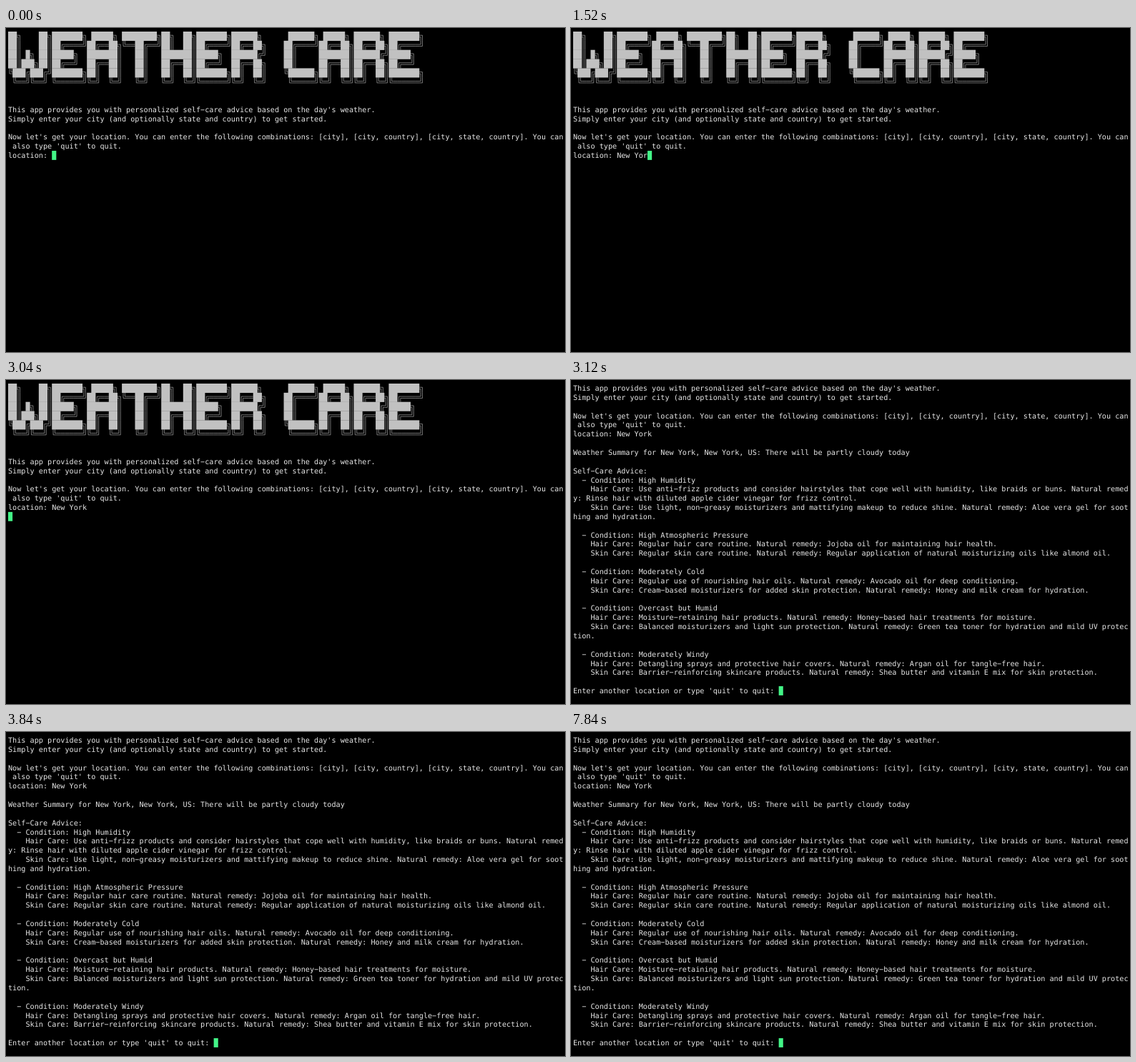
Recreate the animation shown at these times as an HTML page with a canvas. Size 782 by 454 pixels, loop 8.16 s.

```html
<!DOCTYPE html>
<html lang="en">
<head>
<meta charset="utf-8">
<title>Weather Care</title>
<style>
  html, body { margin: 0; width: 100%; height: 100%; overflow: hidden; background: #000; }
  canvas { display: block; }
</style>
</head>
<body>
<canvas id="screen" width="782" height="454"></canvas>
<script>
const LOOP = 8160;
const COLS = 127, ROWS = 34;
const CELL_W = 6.12, CELL_H = 12.85, LEFT = 3, TOP = 5;
const FONT_SIZE = CELL_W / 0.602;
const COLORS = { back: '#000', block: '#c1c1c1', text: '#e6e6e6', cursor: '#43f587' };

const BANNER = `
██╗    ██╗███████╗ █████╗ ████████╗██╗  ██╗███████╗██████╗      ██████╗ █████╗ ██████╗ ███████╗
██║    ██║██╔════╝██╔══██╗╚══██╔══╝██║  ██║██╔════╝██╔══██╗    ██╔════╝██╔══██╗██╔══██╗██╔════╝
██║ █╗ ██║█████╗  ███████║   ██║   ███████║█████╗  ██████╔╝    ██║     ███████║██████╔╝█████╗
██║███╗██║██╔══╝  ██╔══██║   ██║   ██╔══██║██╔══╝  ██╔══██╗    ██║     ██╔══██║██╔══██╗██╔══╝
╚███╔███╔╝███████╗██║  ██║   ██║   ██║  ██║███████╗██║  ██║    ╚██████╗██║  ██║██║  ██║███████╗
 ╚══╝╚══╝ ╚══════╝╚═╝  ╚═╝   ╚═╝   ╚═╝  ╚═╝╚══════╝╚═╝  ╚═╝     ╚═════╝╚═╝  ╚═╝╚═╝  ╚═╝╚══════╝
`.slice(1);

const INTRO = `${BANNER}

This app provides you with personalized self-care advice based on the day's weather.
Simply enter your city (and optionally state and country) to get started.

Now let's get your location. You can enter the following combinations: [city], [city, country], [city, state, country]. You can also type 'quit' to quit.
location: `;

const ANSWER = 'New York';
const KEY_TIMES = [320, 560, 720, 960, 1120, 1280, 1520, 1680];
const ENTER_TIME = 2400, REPORT_TIME = 3120;

const REPORT = `
Weather Summary for New York, New York, US: There will be partly cloudy today

Self-Care Advice:
  - Condition: High Humidity
    Hair Care: Use anti-frizz products and consider hairstyles that cope well with humidity, like braids or buns. Natural remedy: Rinse hair with diluted apple cider vinegar for frizz control.
    Skin Care: Use light, non-greasy moisturizers and mattifying makeup to reduce shine. Natural remedy: Aloe vera gel for soothing and hydration.

  - Condition: High Atmospheric Pressure
    Hair Care: Regular hair care routine. Natural remedy: Jojoba oil for maintaining hair health.
    Skin Care: Regular skin care routine. Natural remedy: Regular application of natural moisturizing oils like almond oil.

  - Condition: Moderately Cold
    Hair Care: Regular use of nourishing hair oils. Natural remedy: Avocado oil for deep conditioning.
    Skin Care: Cream-based moisturizers for added skin protection. Natural remedy: Honey and milk cream for hydration.

  - Condition: Overcast but Humid
    Hair Care: Moisture-retaining hair products. Natural remedy: Honey-based hair treatments for moisture.
    Skin Care: Balanced moisturizers and light sun protection. Natural remedy: Green tea toner for hydration and mild UV protection.

  - Condition: Moderately Windy
    Hair Care: Detangling sprays and protective hair covers. Natural remedy: Argan oil for tangle-free hair.
    Skin Care: Barrier-reinforcing skincare products. Natural remedy: Shea butter and vitamin E mix for skin protection.

Enter another location or type 'quit' to quit: `;

const ctx = document.getElementById('screen').getContext('2d');

// Directions in which the arms of each corner point.
const CORNERS = { '╔': [1, 1], '╗': [-1, 1], '╚': [1, -1], '╝': [-1, -1] };

function drawDoubleLine(char, x, y) {
  const halfW = CELL_W / 2, halfH = CELL_H / 2;
  const cx = x + halfW, cy = y + halfH;
  ctx.beginPath();
  for (const s of [-1.2, 1.2]) {
    if (char === '═') {
      ctx.moveTo(x, cy + s);
      ctx.lineTo(x + CELL_W, cy + s);
    } else if (char === '║') {
      ctx.moveTo(cx + s, y);
      ctx.lineTo(cx + s, y + CELL_H);
    } else {
      const [dx, dy] = CORNERS[char];
      ctx.moveTo(cx + dx * halfW, cy + s * dy);
      ctx.lineTo(cx + s * dx, cy + s * dy);
      ctx.lineTo(cx + s * dx, cy + dy * halfH);
    }
  }
  ctx.stroke();
}

function drawBannerRow(line, y) {
  ctx.fillStyle = COLORS.block;
  for (const { 0: run, index } of line.matchAll(/█+/g)) {
    ctx.fillRect(LEFT + index * CELL_W, y, run.length * CELL_W, CELL_H + 0.2);
  }
  [...line].forEach((char, col) => {
    if (char !== ' ' && char !== '█') drawDoubleLine(char, LEFT + col * CELL_W, y);
  });
}

function drawTextRow(line, y) {
  ctx.fillStyle = COLORS.text;
  // The minus sign gives the wide terminal dash.
  ctx.fillText(line.replaceAll('-', '−'), LEFT, y + 10);
}

function wrap(line) {
  const rows = [];
  do {
    rows.push(line.slice(0, COLS));
    line = line.slice(COLS);
  } while (line);
  return rows;
}

function outputAt(time) {
  const typed = KEY_TIMES.filter(key => key <= time).length;
  let output = INTRO + ANSWER.slice(0, typed);
  if (time >= ENTER_TIME) output += '\n';
  if (time >= REPORT_TIME) output += REPORT;
  return output;
}

function draw(time) {
  ctx.fillStyle = COLORS.back;
  ctx.fillRect(0, 0, 782, 454);
  ctx.font = `${FONT_SIZE}px "DejaVu Sans Mono", monospace`;
  ctx.textRendering = 'geometricPrecision';
  ctx.strokeStyle = COLORS.block;
  ctx.lineWidth = 0.6;

  const rows = outputAt(time).split('\n').flatMap(wrap).slice(-ROWS);
  rows.forEach((line, row) => {
    const y = TOP + row * CELL_H;
    (/[█═]/.test(line) ? drawBannerRow : drawTextRow)(line, y);
  });

  const last = rows.length - 1;
  ctx.fillStyle = COLORS.cursor;
  ctx.fillRect(LEFT + rows[last].length * CELL_W, TOP + last * CELL_H, CELL_W, CELL_H);
}

const start = performance.now();
function tick() {
  draw((performance.now() - start) % LOOP);
  requestAnimationFrame(tick);
}
tick();
</script>
</body>
</html>
```
